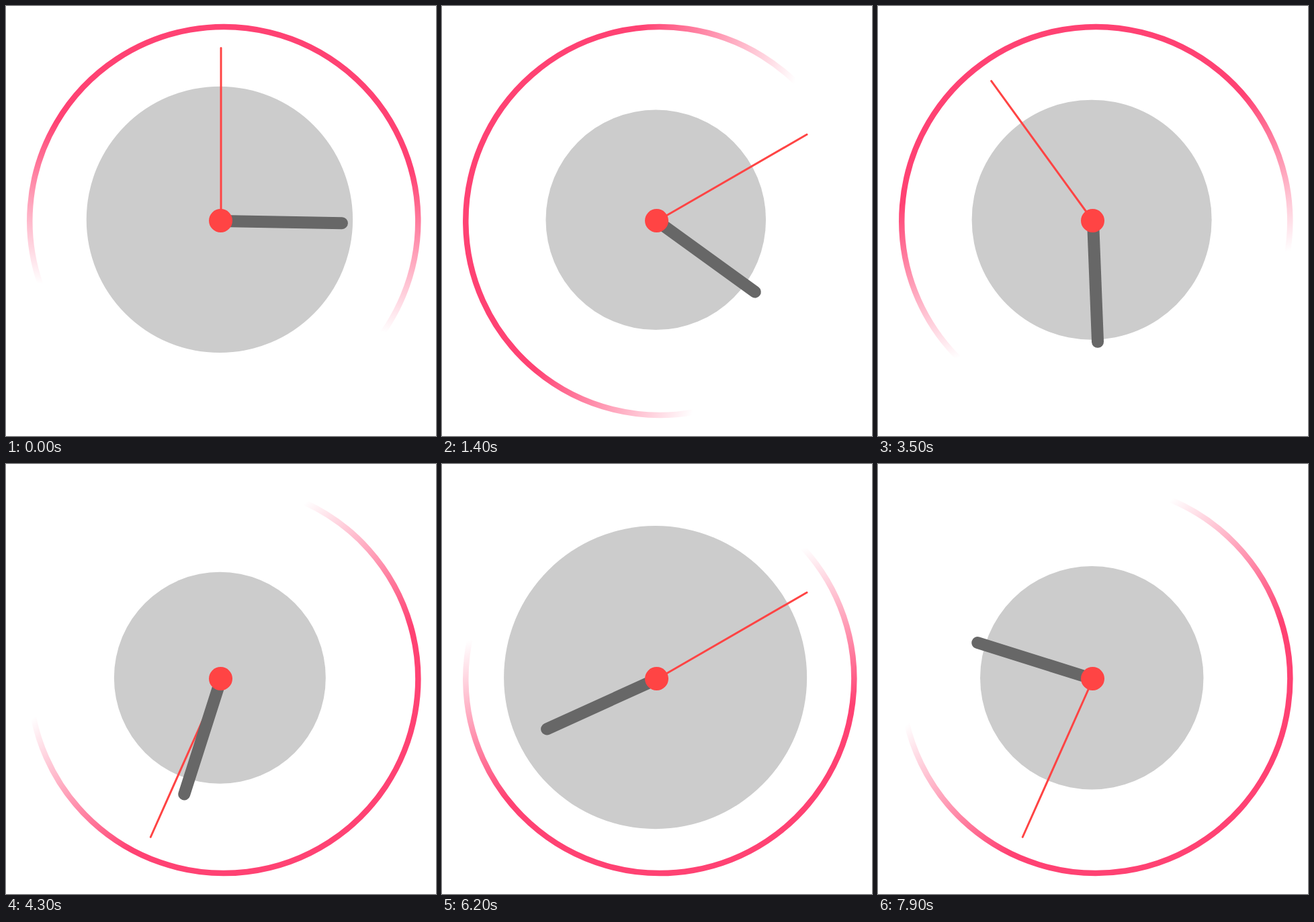
Animation of 640x640 px, one loop 8 s. Source, as an HTML page:

```html
<!DOCTYPE html>
<html lang="en">
<head>
<meta charset="utf-8">
<title>Clock</title>
<style>
  html, body { margin: 0; width: 100%; height: 100%; overflow: hidden; background: #fff; }
  svg { display: block; width: 100vw; height: 100vh; }
</style>
</head>
<body>
<svg viewBox="0 0 640 640">
  <defs>
    <linearGradient id="fade" gradientUnits="userSpaceOnUse" x1="0" y1="131" x2="0" y2="-112">
      <stop offset="0" stop-color="#ff4273" stop-opacity="0"/>
      <stop offset="1" stop-color="#ff4273"/>
    </linearGradient>
  </defs>
  <circle id="disc" fill="#ccc"/>
  <path id="ring" fill="none" stroke="url(#fade)" stroke-width="8.5"/>
  <line id="second" y2="-257.5" stroke="#ff4444" stroke-width="3" stroke-linecap="round"/>
  <line id="hour" y2="-180" stroke="#676767" stroke-width="18" stroke-linecap="round"/>
  <circle cx="319.5" cy="319.5" r="17.5" fill="#ff4444"/>
</svg>
<script>
  const LOOP = 8000, STEP = 100, TICK = 40;
  const RING_R = 289, GAP = 63;
  const [disc, ring, second, hour] =
    ['disc', 'ring', 'second', 'hour'].map(id => document.getElementById(id));

  // [time in ms, disc radius]
  const pulse = [
    [0, 198.2], [1400, 163.8], [2700, 199.5], [4300, 157.5],
    [5500, 213.8], [7000, 240], [7900, 166.2]
  ];

  function radiusAt(t) {
    const i = Math.max(1, pulse.findIndex(p => p[0] >= t));
    const [t0, r0] = pulse[i - 1], [t1, r1] = pulse[i];
    const ease = (1 - Math.cos(Math.PI * (t - t0) / (t1 - t0))) / 2;
    return r0 + (r1 - r0) * ease;
  }

  // Clockwise from twelve o'clock
  function polar(deg) {
    const a = deg * Math.PI / 180;
    return `${RING_R * Math.sin(a)} ${-RING_R * Math.cos(a)}`;
  }

  function place(el, x, y, deg) {
    el.setAttribute('transform', `translate(${x} ${y}) rotate(${deg})`);
  }

  ring.setAttribute('d',
    `M${polar(180 + GAP)}A${RING_R} ${RING_R} 0 1 1 ${polar(180)}`);

  function draw(ms) {
    const t = Math.floor(ms % LOOP / STEP) * STEP;
    const tick = Math.floor(t / TICK);
    const hourAngle = 91 + tick * 360 / 361;
    const r = radiusAt(t);
    const c = 320 - r * 0.0105;

    disc.setAttribute('cx', c);
    disc.setAttribute('cy', c);
    disc.setAttribute('r', r);
    place(ring, 324.3, 320, hourAngle * 8);
    place(second, 320, 320, tick * 12);
    place(hour, 320, 320, hourAngle);
  }

  const start = performance.now();
  function loop() {
    draw(performance.now() - start);
    requestAnimationFrame(loop);
  }
  loop();
</script>
</body>
</html>
```
